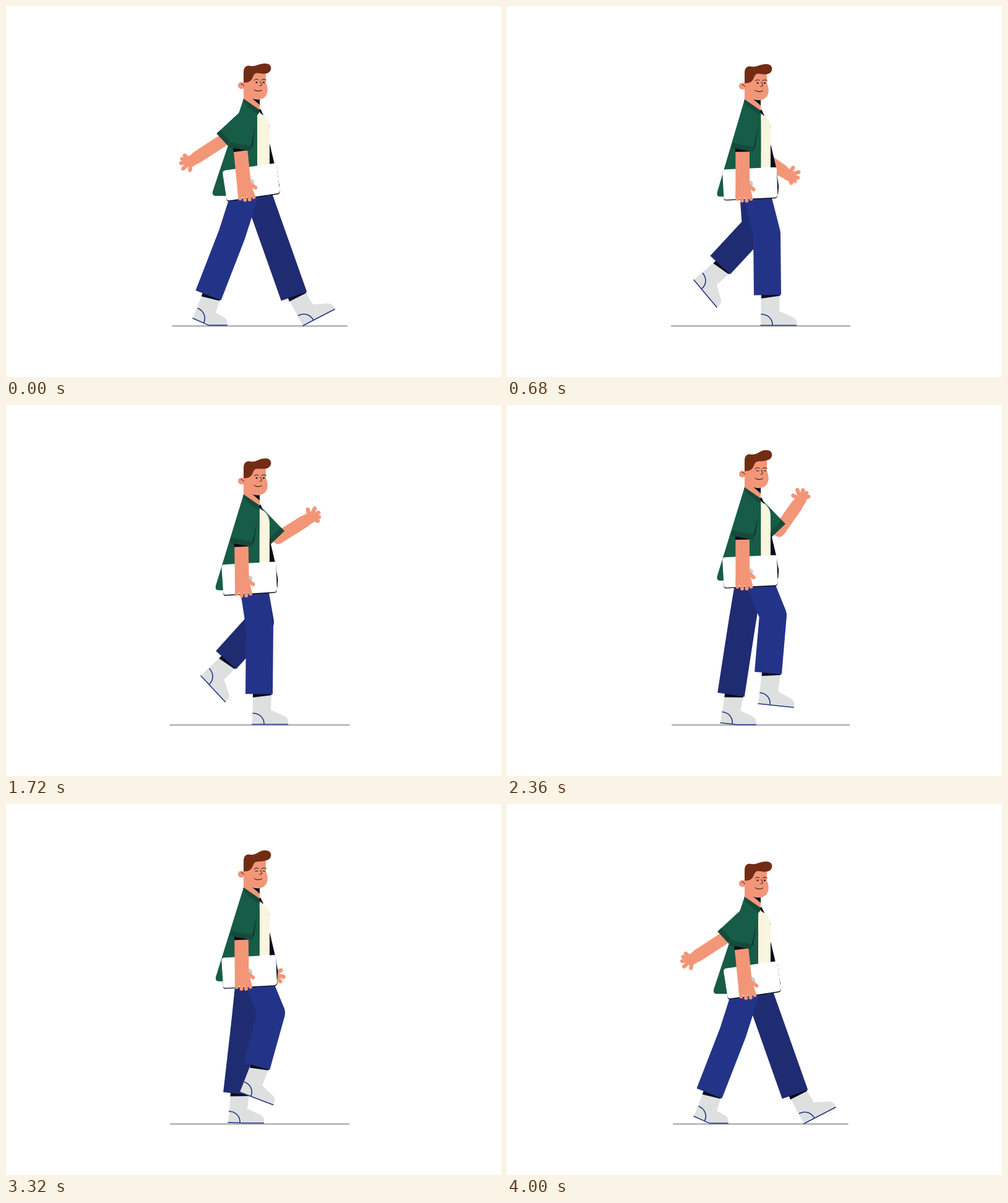
An HTML page with a canvas for the animation above (4040 ms loop, 800 px wide and 600 px high).

```html
<!DOCTYPE html>
<html lang="en">
<head>
<meta charset="utf-8">
<title>Walking man</title>
<style>
html, body { margin: 0; height: 100%; overflow: hidden; background: #fff; }
canvas { display: block; }
</style>
</head>
<body>
<canvas id="stage" width="800" height="600"></canvas>
<script>
const ctx = document.getElementById('stage').getContext('2d');
const SKIN = '#f39678', GREEN = '#175c46', CUFF = '#164a3b', INK = '#060b1c',
  BLUE = '#233488', NAVY = '#1f2c72', BOOT = '#dde0df', HAIR = '#732c14', CREAM = '#f9f5df';
const LOOP = 4040, WALK = 1000, FRAME = 40, RAD = Math.PI / 180;

// phase, knee x y, cuff x y, heel x y, sole angle, toe bend
const LEG = [
  [0, 365, 370, 327, 468, 302, 505, 24, -24],
  [.12, 395, 363, 336, 429, 290, 450, 55.7, 0],
  [.18, 402, 357, 344.5, 419, 302, 443, 50, 0],
  [.22, 411, 351, 355.5, 412.5, 315, 438, 47, 0],
  [.32, 429, 338, 405, 424, 378, 466, 21, 0],
  [.36, 430, 340, 422, 433.5, 406, 483, 6, 0],
  [.5, 430, 369, 465.5, 469.5, 480, 517, -27.5, 0],
  [.62, 425, 369, 431, 470, 425, 517.5, -4, 0],
  [.68, 420, 368, 421, 467.5, 410, 516.5, 0, 0],
  [.72, 410, 360, 409, 467.5, 398, 516.5, 0, 0],
  [.82, 386, 355, 373, 468.5, 359, 515, 2, -2],
  [.86, 380, 352, 362, 468.5, 345, 514, 6, -6]
];

// half-step phase, body height
const BOB = [[0, 93], [.06, 98.3], [.12, 99], [.18, 94], [.22, 87.5], [.32, 78], [.36, 76], [.42, 81]];

// phase, swing of the arm with the laptop
const CARRY = [[0, 1], [.12, .8], [.32, .15], [.36, .07], [.5, -.05], [.68, .05], [.72, .18], [.86, .7]];

// time, upper arm, forearm, hand (degrees from straight down)
const SWING = [[0, -47, -57, -79], [120, -18, -40, -55], [320, 5, 30, 45],
  [500, 30, 75, 80], [680, 8, 55, 74], [840, -25, -5, 0]];
const WAVE = [[1500, 36, 92, 90], [1720, 44, 122, 122], [1900, 44, 146, 168],
  [2130, 44, 122, 118], [2360, 44, 145, 167], [2520, 40, 118, 112]];
const ARM = [0, 1, 2, 3]
  .flatMap(n => SWING.map(([t, ...pose]) => [t + n * WALK, ...pose]))
  .filter(([t]) => t < 1400 || t > 2600)
  .concat(WAVE)
  .sort((a, b) => a[0] - b[0]);

// Smooth periodic interpolation through unevenly spaced keys
function sample(keys, period, t) {
  const n = keys.length;
  t = ((t % period) + period) % period;
  const key = i => {
    const turn = Math.floor(i / n), [at, ...v] = keys[i - turn * n];
    return [at + turn * period, ...v];
  };
  let i = n - 1;
  while (keys[i][0] > t) i--;
  const [a, b, c, d] = [key(i - 1), key(i), key(i + 1), key(i + 2)];
  const h = c[0] - b[0], s = (t - b[0]) / h;
  const slope = (p, q, r, k) => {
    const h0 = q[0] - p[0], h1 = r[0] - q[0];
    return ((q[k] - p[k]) / h0 * h1 + (r[k] - q[k]) / h1 * h0) / (h0 + h1);
  };
  return b.slice(1).map((v, j) => {
    const k = j + 1, m0 = slope(a, b, c, k) * h, m1 = slope(b, c, d, k) * h;
    const diff = c[k] - v;
    return v + s * (m0 + s * (3 * diff - 2 * m0 - m1 + s * (m0 + m1 - 2 * diff)));
  });
}

const place = (x, y, deg, [ox, oy]) => {
  const c = Math.cos(deg * RAD), s = Math.sin(deg * RAD);
  return [ox + x * c - y * s, oy + x * s + y * c];
};
const reach = ([x, y], deg, len) => [x + len * Math.sin(deg * RAD), y + len * Math.cos(deg * RAD)];

function fill(d, color) {
  ctx.fillStyle = color;
  ctx.fill(new Path2D(d));
}
function stroke(d, color, width, cap = 'round') {
  ctx.strokeStyle = color;
  ctx.lineWidth = width;
  ctx.lineCap = cap;
  ctx.lineJoin = 'round';
  ctx.stroke(new Path2D(d));
}
function dot(x, y, r, color) {
  ctx.fillStyle = color;
  ctx.beginPath();
  ctx.arc(x, y, r, 0, 7);
  ctx.fill();
}

function leg(phase, bob, color) {
  const [kx, ky, cx, cy, hx, hy, sole, bend] = sample(LEG, 1, phase);
  const shin = Math.atan2(cy - ky, cx - kx) / RAD - 90;
  const cuff = (x, y) => place(x, y, shin, [cx, cy]);
  const foot = (x, y) => place(x, y, sole, [hx, hy]);
  const ball = foot(28, 0);
  const toe = (x, y) => place(x - 28, y, sole + bend, ball);

  fill(`M${cuff(-10, 0)}L${foot(0, 0)}L${ball}L${toe(58, 0)}L${toe(58, -6)}
    Q${toe(57, -11)} ${toe(52, -13.5)}L${foot(30, -23)}L${cuff(20, 0)}Z`, BOOT);
  stroke(`M${foot(0, 0)}L${ball}L${toe(57.5, 0)}`, BLUE, 1.6);
  stroke(`M${foot(1, -18)}C${foot(11, -18)} ${foot(19, -11)} ${foot(19, -1)}`, BLUE, 1.6);
  fill(`M${cuff(-10, -3)}L${cuff(20, -3)}L${cuff(20, 1.5)}L${cuff(-10, 5.5)}Z`, INK);
  stroke(`M396 ${bob + 180}L${kx} ${ky}L${cx} ${cy}`, color, 44, 'butt');
}

function wavingArm(t, bob) {
  const [upper, fore, hand] = sample(ARM, 4 * WALK, t);
  const shoulder = [396, bob + 82];
  const elbow = reach(shoulder, upper, 63), palm = reach(elbow, fore, 61);
  stroke(`M${elbow}L${reach(elbow, fore, 50)}`, SKIN, 20);
  stroke(`M${reach(elbow, fore, 45)}L${palm}`, SKIN, 18);
  const tips = [[4, -13.5], [14.5, -9], [16, 0], [13, 6.5], [8, 11]];
  for (const [x, y] of tips) stroke(`M${palm}L${place(x, y, 90 - hand, palm)}`, SKIN, 6.4);
  stroke(`M${reach(shoulder, upper, 12)}L${reach(shoulder, upper, 62)}`, GREEN, 30, 'butt');
  stroke(`M${reach(shoulder, upper, 54)}L${reach(shoulder, upper, 62)}`, CUFF, 30, 'butt');
}

function torso(k, sag) {
  const left = 340 - 6 * k, right = 439 + 3 * k, edge = 410.5 - 4.5 * k, hem = 307 + sag;
  fill(`M411 166L416 177L426 193V222L434 256L${right} ${290 + sag}L${right - 1} ${hem - 4}L426 ${hem}H${edge}Z`, INK);
  fill(`M${edge} 178L411 173Q426 181 426 197V${hem}H${edge}Z`, CREAM);
  fill(`M384 150L411 168L${edge} 177V${hem}H${left + 4}Q${left - 1} ${hem} ${left} ${hem - 7}Z`, GREEN);
  fill('M384 149L411 167L408 175Q394 167 383 155Z', CUFF);
  fill('M409 167L412 168L416 177L410 172Z', INK);
}

function head(lift, blink) {
  dot(380.5, 128.5, 5.6, SKIN);
  fill(`M384 105H420V124C425 134 424 150 409 151Q403 151 398 149L410 160V168L384 150Z`, SKIN);
  fill('M398 149.5Q404 152 410 151V160Z', INK);
  stroke('M380 126Q383 126 384.5 129', INK, .9);
  fill(`M384 124V107C384 99 389 95 395 97C405 98 409 ${93 - lift} 418 ${93 - lift}
    C430 ${92 - lift} 431 ${104 - lift} 424 ${108 - lift}C415 ${112 - lift} 409 107 403 109
    C398 112 400 121 390 123.5Z`, HAIR);
  stroke('M401 120Q404 117 408 119M413 119.5Q417 117 420.5 119.5', INK, .9);
  if (blink) stroke('M403 123.5H407M415 123.5H418.5', INK, .9);
  else {
    dot(405, 123.5, 1.6, '#3a2a26');
    dot(416.5, 123.5, 1.6, '#3a2a26');
  }
  stroke('M411 122L413.5 127Q413 129.5 410 129', INK, .9);
  stroke('M401 135.5Q407 139.5 413.5 136', INK, 1);
}

function carryingArm(k) {
  ctx.save();
  ctx.translate(381 - 1.5 * k, 235);
  ctx.rotate(-6 * k * RAD);
  ctx.translate(-381, -235);
  const laptop = 'M353 263L432 260Q436 260 436 264L437 304Q437 309 432 309L354 312Q350 312 350 308L348 268Q348 263 353 263Z';
  ctx.translate(0, 1.4);
  fill(laptop, INK);
  ctx.translate(0, -1.4);
  fill(laptop, '#fff');
  dot(392.5, 286.5, 5, '#cbcdcd');
  fill('M369.5 230H392V286L395 309H369Z', SKIN);
  stroke('M390 289L398.5 296', SKIN, 6);
  stroke('M372 300V311M379.5 300V314M387 300V314M391 298L394 311', SKIN, 6);
  fill('M369 228L392 232V234.5L369 235Z', INK);
  ctx.restore();

  ctx.save();
  ctx.translate(-3.2 * k, 0);
  fill(`M${384 + 3 * k} 153L364.5 221L400 227L406 196Z`, GREEN);
  fill('M406.5 194L399 229L400.5 229L401.5 222Z', INK);
  fill('M365 219.5Q382 225 400.5 226L398 235Q380 231 363 228.5Z', CUFF);
  ctx.restore();
}

function draw(now) {
  const t = Math.floor((now % LOOP) / FRAME) * FRAME;
  const phase = (t / WALK) % 1;
  const [bob] = sample(BOB, .5, phase);
  const [k] = sample(CARRY, 1, phase);

  ctx.clearRect(0, 0, 800, 600);
  const half = 142.5 - 2 * Math.cos(4 * Math.PI * phase);
  stroke(`M${410 - half} 517.5H${410 + half}`, '#bcbcbc', 2.8);

  wavingArm(t, bob);
  leg(phase + .5, bob, NAVY);
  leg(phase, bob, BLUE);

  ctx.save();
  ctx.translate(0, bob - 93);
  torso(k, (bob - 93) * .35);
  head(Math.min(3, Math.max(0, (93 - bob) / 5)), phase > .3 && phase < .4);
  carryingArm(k);
  ctx.restore();
}

const start = performance.now();
function tick() {
  draw(performance.now() - start);
  requestAnimationFrame(tick);
}
tick();
</script>
</body>
</html>
```
